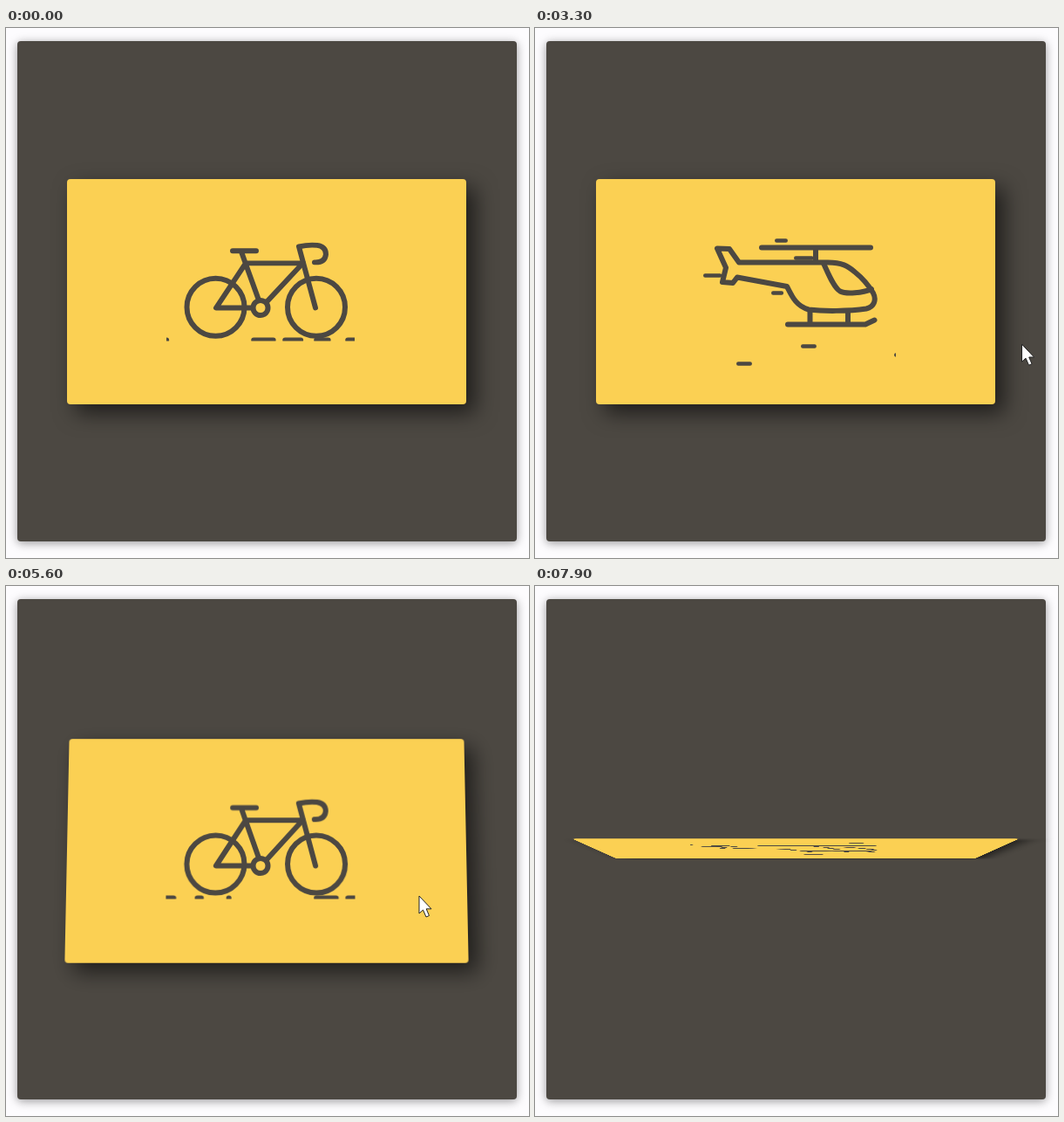
Animation of 600 by 607 pixels, one loop 8000 ms. Source, as an HTML page:

```html
<!DOCTYPE html>
<html lang="en">
<head>
<meta charset="utf-8">
<title>Flip card</title>
<style>
  html, body { margin: 0; width: 100%; height: 100%; overflow: hidden; }
  .stage { position: relative; width: 100%; height: 100%; overflow: hidden; contain: strict; background: #fdfcfe; }
  .panel, .face, .cursor { position: absolute; }
  .panel {
    left: 13px; top: 15px; width: 572.5px; height: 573px; border-radius: 4px;
    background: #4c4842; box-shadow: 0 2px 11px rgba(0, 0, 0, .4);
  }
  .face {
    left: 70px; top: 172.5px; width: 458px; height: 257.5px; border-radius: 4px;
    background: #fbd053; box-shadow: 10px 10px 25px rgba(0, 0, 0, .6);
  }
  .face svg { display: block; width: 100%; height: 100%; }
  .line { fill: none; stroke: #4c4842; stroke-width: 6; stroke-linecap: round; stroke-linejoin: round; }
  .body { fill: #fbd053; }
  .wind { stroke-width: 4.4; }
  .cursor { left: 0; top: 0; }
</style>
</head>
<body>
<div class="stage">
  <div class="panel"></div>

  <div class="face" id="bike">
    <svg viewBox="70 172.5 458 257.5">
      <clipPath id="road"><rect x="184" y="350" width="216" height="8"/></clipPath>
      <g class="line">
        <g id="wheels">
          <circle cx="240.5" cy="318" r="33"/>
          <circle cx="356" cy="318" r="33"/>
        </g>
        <g id="frame">
          <path d="M260 253H287M270 254L274.5 267L290 311M275 267.5H341M275 267.5L241 320H283M340 268L299 313"/>
          <path d="M355 320L336 248Q347 245.5 357 246.5Q367 248 367 257Q366 267 354 266.5"/>
        </g>
        <circle cx="292" cy="320" r="8.5"/>
        <path id="ground" clip-path="url(#road)"/>
      </g>
    </svg>
  </div>

  <div class="face" id="heli">
    <svg viewBox="70 172.5 458 257.5">
      <clipPath id="sky"><rect x="184" y="200" width="230" height="200"/></clipPath>
      <g class="line">
        <path id="wind" class="wind" clip-path="url(#sky)"/>
        <g id="craft">
          <path d="M260 251H385M322 252V266M315.5 323V337M359 323V337M290 339H379L389.5 334"/>
          <path class="body" d="M209 252L223 252.5L234 268H336C352 268 359 272 367 279
            C377 287 385 298 388 303C392 311 389 319 380 321C360 324 330 324 314 322
            C299 318 294 305 289 295.5L232 285L227 291.5L215 290.5L219 274Z"/>
          <path d="M331 269C337 282 343 297 350 301C357 304.5 376 303 386 298.5"/>
        </g>
      </g>
    </svg>
  </div>

  <svg class="cursor" id="cursor" width="17" height="27" viewBox="-1 -1 17 27">
    <path d="M0 0V20L4.5 16L8 24L11.5 22.5L8.2 14.8H14Z" fill="#fff" stroke="#222" stroke-linejoin="round"/>
  </svg>
</div>

<script>
const LOOP = 8000, TURN = 1000, SPEED = 0.0872, BOB = 1240;
const el = id => document.getElementById(id);
const mod = (a, n) => ((a % n) + n) % n;
const wave = t => .5 + .5 * Math.cos(2 * Math.PI * t / BOB);

// turns alternate: helicopter, bike, helicopter, bike
const turns = [846, 3450, 5550, 7621];

// pointer visits: time, x, y
const visits = [
  [[300, 535, 18], [800, 461, 350], [3050, 461, 350], [3400, 597, 367]],
  [[5250, 612, 346], [5560, 474, 355], [7320, 473, 356], [7580, 612, 364]]
];

// where each gust starts on its lane
const gusts = [161, 275, 297, 193, 271, 305, 412, 231];

// cubic-bezier(.25, .1, .25, 1)
function ease(x) {
  if (x <= 0 || x >= 1) return x <= 0 ? 0 : 1;
  const curve = (s, a, b) => 3 * a * s * (1 - s) ** 2 + 3 * b * s * s * (1 - s) + s ** 3;
  let lo = 0, hi = 1;
  for (let i = 0; i < 24; i++) {
    const mid = (lo + hi) / 2;
    if (curve(mid, .25, .25) < x) lo = mid; else hi = mid;
  }
  return curve(lo, .1, 1);
}

function dash(x, y, w) {
  const cap = Math.min(2.3, w / 2);
  return `M${x + cap} ${y}H${x + w - cap + .01}`;
}

function pose(face, angle, shown) {
  face.style.transform = `perspective(1200px) rotateX(${angle}deg)`;
  face.style.visibility = shown ? "visible" : "hidden";
}

function flip(t) {
  const angle = turns.reduce((sum, at, i) => sum + (i % 2 ? -180 : 180) * ease((t - at) / TURN), 0);
  pose(el("bike"), angle, angle < 90);
  pose(el("heli"), angle - 180, angle >= 90);
}

function drawBike(t) {
  const dip = wave(t), squash = 1 - .026 * dip;
  el("wheels").setAttribute("transform", `translate(0 ${1.2 * dip})`);
  el("frame").setAttribute("transform", `translate(0 ${320 * (1 - squash)}) scale(1 ${squash})`);
  // evenly spaced dashes, each shorter than the last, on a belt 280 long
  let d = "";
  for (let k = 0; k < 6; k++) {
    d += dash(157 + mod(36 * k - 155 - SPEED * t, 280), 357, 27 - 4.5 * k);
  }
  el("ground").setAttribute("d", d);
}

function drawHeli(t) {
  el("craft").setAttribute("transform", `translate(0 ${2 * wave(t - 6400)})`);
  // five lanes around the rotor and tail, three closer ones below the skids
  const d = gusts.map((start, i) => {
    const y = i < 5 ? 223 + 20 * i : 314 + 10 * i;
    const w = 19 + 5 * Math.cos(1.745 * i - 4.19);
    return dash(154 + mod(start - 154 - SPEED * (t - 3300), 298), y, w);
  });
  el("wind").setAttribute("d", d.join(""));
}

function movePointer(t) {
  const path = visits.find(v => t >= v[0][0] && t < v[3][0]);
  el("cursor").style.visibility = path ? "visible" : "hidden";
  if (!path) return;
  const i = path.findIndex(p => p[0] > t);
  const a = path[i - 1], b = path[i];
  const k = (t - a[0]) / (b[0] - a[0]);
  const at = n => a[n] + (b[n] - a[n]) * k - 1;
  el("cursor").style.transform = `translate(${at(1)}px, ${at(2)}px)`;
}

function render(t) {
  flip(t);
  drawBike(t);
  drawHeli(t);
  movePointer(t);
}

const begin = performance.now();
function tick() {
  render((performance.now() - begin) % LOOP);
  requestAnimationFrame(tick);
}
render(0);
requestAnimationFrame(tick);
</script>
</body>
</html>
```
